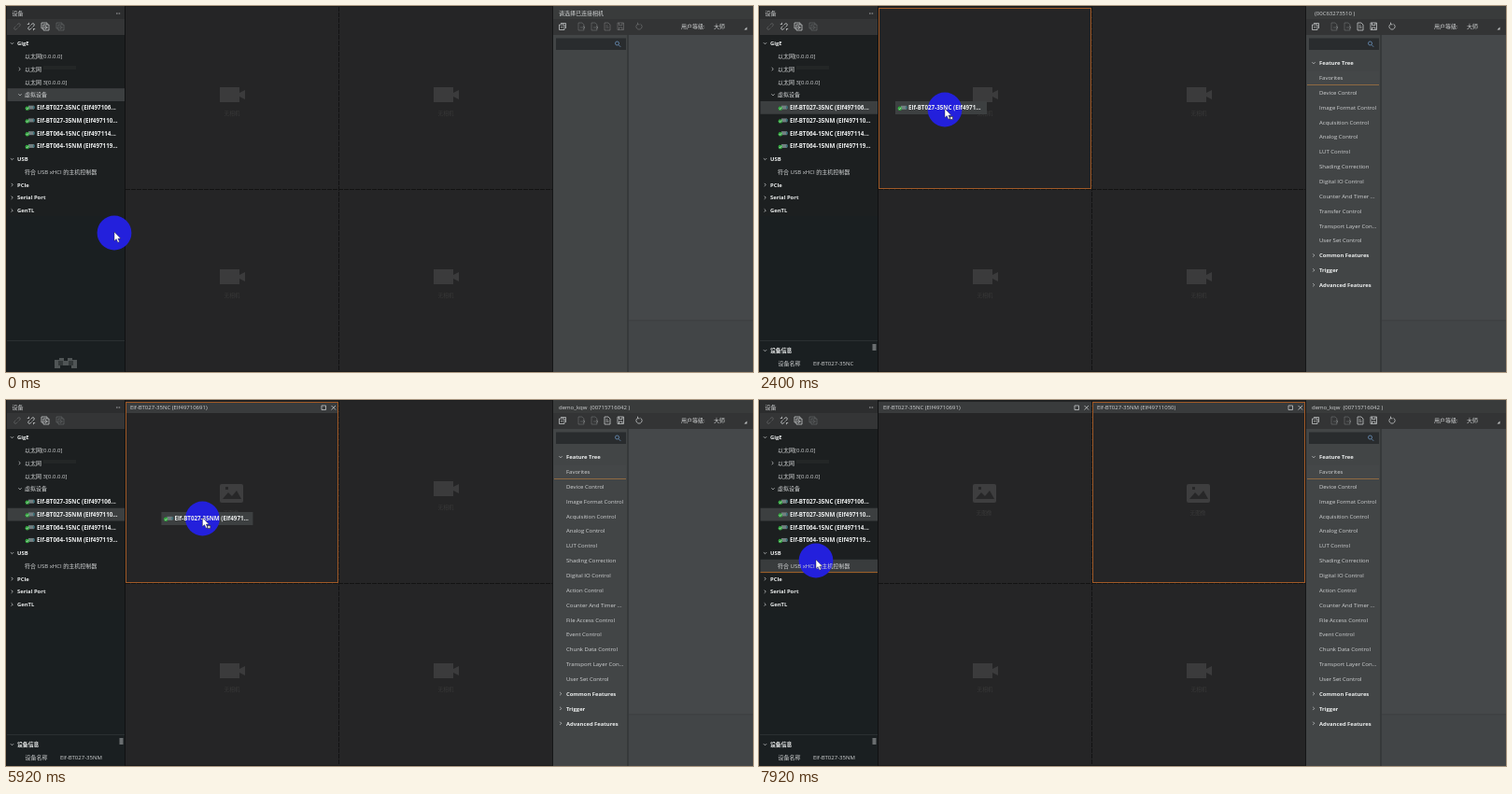
These frames come from a looping animation (800 by 392 pixels, 8000 ms). An HTML page:

```html
<!DOCTYPE html>
<html lang="zh-CN">
<head>
<meta charset="utf-8">
<title>Camera client</title>
<style>
html, body { margin: 0; width: 100%; height: 100%; overflow: hidden; background: #1b1d1e; }
svg { display: block; width: 800px; height: 392px; }
text { font: 6px "Open Sans", "Noto Sans CJK SC", "Noto Sans CJK", sans-serif; fill: #d2d4d5; white-space: pre; }
.b { font-weight: 700; font-size: 5.85px; fill: #eceeee; }
.dev { font-size: 6.25px; }
.cap { fill: #393939; text-anchor: middle; font-size: 5.6px; }
.line { fill: none; stroke: #c4c7c8; stroke-width: .8; }
.dim { opacity: .28; }
.split { fill: none; stroke: #131313; stroke-dasharray: 5 1; }
.lens { stroke: #6b93bd; }
</style>
</head>
<body>
<svg id="stage" viewBox="0 0 800 392" xmlns="http://www.w3.org/2000/svg"></svg>
<script>
const LOOP = 8000;
const stage = document.getElementById('stage');

function add(tag, attrs, parent = stage) {
  const el = document.createElementNS('http://www.w3.org/2000/svg', tag);
  for (const k in attrs) el.setAttribute(k, attrs[k]);
  parent.appendChild(el);
  return el;
}
const group = (parent, cls = '') => add('g', { class: cls }, parent);
const rect = (x, y, width, height, fill, parent) => add('rect', { x, y, width, height, fill }, parent);
const line = (d, parent, cls = 'line') => add('path', { d, class: cls }, parent);
function text(x, y, str, cls = '', parent) {
  const el = add('text', { x, y: y + 2.2, class: cls }, parent);
  el.textContent = str;
  return el;
}
const chevron = (x, y, open, parent) =>
  line(open ? `M${x - 1.6} ${y - .8}l1.6 1.6l1.6-1.6` : `M${x - .8} ${y - 1.6}l1.6 1.6l-1.6 1.6`, parent);
const show = (el, on) => el.setAttribute('visibility', on ? 'visible' : 'hidden');
const move = (el, x, y) => el.setAttribute('transform', `translate(${x} ${y})`);
const setText = (el, str) => { if (el.textContent !== str) el.textContent = str; };

// Panels
rect(0, 0, 800, 392, '#1b1d1e');
rect(1, 0, 126, 14, '#2c2d2e');
rect(1, 14, 126, 17, '#343536');
rect(1, 31, 126, 361, '#1c1f20');
rect(1, 225, 126, 167, '#1a1f21');
rect(127, 0, 1, 392, '#101112');
rect(128, 1, 457, 390, '#252526');
rect(585, 0, 1, 392, '#151617');
rect(586, 0, 214, 14, '#393b3b');
rect(586, 14, 214, 17, '#333435');
rect(586, 31, 79, 361, '#424546');
rect(665, 31, 1.5, 361, '#36393a');
rect(666.5, 31, 133.5, 361, '#45484a');
rect(667, 336.5, 133, 1, '#383b3c');
rect(667, 337.5, 133, 54, '#424547');
line('M128 196.5H585M356.5 1V391', stage, 'split');

// Left header and toolbar
text(6.5, 8, '设备');
line('M118 8h1.6m1 0h1.6');
const link = (x, cls) => line('M-.7-1.4h-2a1.4 1.4 0 0 0 0 2.8h2M.7-1.4h2a1.4 1.4 0 0 1 0 2.8h-2', stage, cls)
  .setAttribute('transform', `translate(${x} 22) rotate(-45)`);
const stack = (x, cls) => line(`M${x - 4} 18h6v2M${x - 4} 18v6h2M${x - 2} 20h6v6h-6ZM${x} 21.5v3l2.5-1.5Z`, stage, cls);
link(12, 'line dim');
link(27, 'line');
line('M22.8 19.5h2M24.5 17.8v1.6M29.2 24.5h2M29.5 24.6v1.6');
stack(42, 'line');
stack(58, 'line dim');

// Right header and toolbar
const title = text(592, 8, '');
line('M592.5 20h5.5v5.5h-5.5ZM594 18.5h5.5v5.5M594 22.8h2.5');
const doc = (x, mark) => line(`M${x - 3} 18h4l2 2v6h-6ZM${mark}`, stage);
[616, 630].forEach(x => doc(x, `${x - 1} 23h5m-2-2l2 2l-2 2`).setAttribute('opacity', .3));
const saves = [doc(644, '642.5 21h2m-2 2h3'), line('M655 18h6.5v7.5h-6.5ZM656.5 18v2.5h3.5V18M656.5 25.5v-2.5h3.5v2.5'),
  line('M679.5 19.3a3.1 3.1 0 1 1-3 0M676.5 17.6v2.2h2')];
text(723, 22, '用户等级:');
text(758, 22, '大师');
add('path', { d: 'M790.5 25.5h3v-3Z', fill: '#c4c6c7' });
rect(589, 34.5, 75, 12.5, '#292c2e');
line('M652.5 40a2 2 0 1 1 4 0a2 2 0 1 1-4 0M656 41.6l2.2 2.2', stage, 'line lens');

// Viewer cells
const cells = [[128, 2], [357, 2], [128, 197], [357, 197]].map(([x, y], i) => {
  const camera = group(), cx = x + 114;
  rect(cx - 13, y + 85, 21, 16, '#3b3b3c', camera);
  add('path', { d: `M${cx + 8} ${y + 91}l6-3v10l-6-3Z`, fill: '#3b3b3c' }, camera);
  text(cx, y + 113, '无相机', 'cap', camera);
  if (i > 1) return { camera };

  const view = group();
  rect(x, y, 228, 12, '#393b3c', view);
  text(x + 5, y + 6, ['Elf-BT027-35NC (Elf49710691)', 'Elf-BT027-35NM (Elf49711050)'][i], '', view);
  line(`M${x + 210} ${y + 4}h4.5v4.5h-4.5ZM${x + 220.5} ${y + 4}l4.5 4.5m0-4.5l-4.5 4.5`, view);
  add('rect', { x: cx - 13, y: y + 88, width: 25, height: 20, rx: 2, fill: '#3e3e3f' }, view);
  add('path', { d: `M${cx - 10} ${y + 104}l6-7l4 4l5-6l5 9ZM${cx - 7} ${y + 91}h3v3h-3Z`, fill: '#272728' }, view);
  text(cx - 1, y + 119, '无图像', 'cap', view);
  const frame = add('rect', { x: x + .5, y: y + .5, width: 227, height: 193, fill: 'none', stroke: '#a05a28' });
  return { camera, view, frame };
});

// Row backgrounds; the pointer's halo lies over them and under the text
const rowY = i => 40 + 13.77 * i;
const pick = rect(1.5, 0, 125.5, 13.8, '#3c3f40');
const hoverBg = rect(1.5, 0, 125.5, 13.8, '#393c3d');
const hoverLine = rect(1.5, 0, 125.5, 1, '#a8642a');
const labelBg = rect(0, -7, 98, 14, '#3d4041');
const halo = add('circle', { r: 18.4 });
const badge = group();
rect(112, -6.4, 14.5, 12.6, '#4c4f50', badge).setAttribute('opacity', .6);
line('M117-1.5l2-1.5l2.5 2.5l-1.5 2ZM117-1.5l2.5 3M115.5-4l7 7', badge);

// Device list
function deviceIcon(x, y, parent) {
  rect(x + 4, y - 2.2, 6, 4, '#727f81', parent);
  rect(x + 9, y - 1.6, 1.8, 2.8, '#3b6f78', parent);
  add('circle', { cx: x + 2.8, cy: y + .8, r: 2.2, fill: '#2fab3c' }, parent);
  line(`M${x + 1.6} ${y + .8}l1 1l1.6-2`, parent);
}
const models = ['Elf-BT027-35NC', 'Elf-BT027-35NM', 'Elf-BT064-15NC', 'Elf-BT064-15NM'];
const serials = ['497106', '497110', '497114', '497119'];
const deviceText = models.map((m, i) => {
  const y = rowY(5 + i);
  deviceIcon(20, y, stage);
  return text(33, y, '', 'b dev');
});
[[0, 'GigE', 1], [9, 'USB', 1], [11, 'PCIe', 0], [12, 'Serial Port', 0], [13, 'GenTL', 0]].forEach(([i, s, open]) => {
  chevron(6.5, rowY(i), open);
  text(12, rowY(i), s, 'b');
});
[[1, '以太网[0.0.0.0]'], [2, '以太网'], [3, '以太网 3[0.0.0.0]'], [4, '虚拟设备'], [10, '符合 USB xHCI 的主机控制器']]
  .forEach(([i, s]) => text(20, rowY(i), s));
chevron(14.5, rowY(2), false);
chevron(15, rowY(4), true);
rect(40, 64, 35, 4, '#232626');

// Device details
rect(1, 358, 126, 1, '#2a2f31');
const blank = group();
add('path', { d: 'M52 379h5v-2h5v3h4v-3h5v2h5v9h-6v-3h-12v3h-6Z', fill: '#505556' }, blank);
rect(56, 380, 5, 5, '#34393a', blank);
rect(67, 380, 5, 5, '#34393a', blank);
const info = group();
chevron(6.5, 369, true, info);
text(12, 369, '设备信息', 'b', info);
text(20.5, 383, '设备名称', '', info);
const infoName = text(58, 383, '', '', info);
rect(121.5, 362, 4, 7, '#6a6e70', info);

// Feature trees: the first has fewer entries than the second
const head = ['Favorites', 'Device Control', 'Image Format Control', 'Acquisition Control', 'Analog Control',
  'LUT Control', 'Shading Correction', 'Digital IO Control'];
const tail = ['Transport Layer Con...', 'User Set Control'];
const trees = [
  [...head, 'Counter And Timer ...', 'Transfer Control', ...tail],
  [...head, 'Action Control', 'Counter And Timer ...', 'File Access Control', 'Event Control', 'Chunk Data Control', ...tail]
].map(items => {
  const g = group();
  rect(587, 69.5, 77, 14.5, '#444748', g);
  rect(587, 84, 77, 1, '#8f6a42', g);
  ['Feature Tree', ...items, 'Common Features', 'Trigger', 'Advanced Features'].forEach((s, i) => {
    const y = 61 + 15.85 * i, bold = i === 0 || i > items.length;
    if (bold) chevron(594, y, i === 0, g);
    text(600, y, s, bold ? 'b' : '', g);
  });
  return g;
});

// Dragged label and pointer
const label = group();
deviceIcon(2, 0, label);
const labelText = text(14, 0, '', 'b dev', label);
const arrow = group();
add('path', { d: 'M0-1V8.6L2.2 6.6L3.8 10.2L5.4 9.5L3.9 6H6.8Z', fill: '#fff', stroke: '#222', 'stroke-width': .4 }, arrow);
const dragMark = add('rect', { x: 5.5, y: 7.5, width: 3, height: 3, fill: '#ddd', stroke: '#333', 'stroke-width': .6 }, arrow);

const path = [[0, 116, 243], [150, 116, 243], [800, 87, 111], [1850, 87, 111], [2400, 199, 111], [2720, 236, 112],
  [2900, 236, 112], [3600, 122, 137], [3800, 120, 130], [4450, 81, 127], [5550, 81, 127], [6600, 533, 127],
  [6860, 540, 125], [7020, 540, 125], [7800, 61, 172], [8000, 61, 172]];

function pointer(t) {
  const i = Math.max(1, path.findIndex(p => p[0] > t));
  const [t0, x0, y0] = path[i - 1], [t1, x1, y1] = path[i];
  const u = (t - t0) / (t1 - t0), e = u * u * (3 - 2 * u);
  return [x0 + (x1 - x0) * e, y0 + (y1 - y0) * e];
}

function draw(t) {
  const [x, y] = pointer(t);
  const within = (a, b) => t >= a && t < b;
  const drag = within(1900, 2780) ? 0 : within(5620, 6900) ? 1 : -1;
  const dragging = drag >= 0;
  const linked = t >= 1240, second = t >= 5300;

  const row = Math.round((y - 40) / 13.77);
  const hover = !dragging && x < 127 && row > 0 && row < 14 ? row : -1;
  const overDevice = hover > 4 && hover < 9;
  const selected = t < 820 ? 4 : t < 5100 ? 5 : 6;

  pick.setAttribute('y', rowY(selected) - 6.9);
  show(hoverBg, hover > 0);
  show(hoverLine, hover > 0);
  show(badge, overDevice);
  if (hover > 0) {
    hoverBg.setAttribute('y', rowY(hover) - 6.9);
    hoverLine.setAttribute('y', rowY(hover) + 6.4);
    move(badge, 0, rowY(hover));
  }
  deviceText.forEach((el, i) => setText(el, `${models[i]} (Elf${hover === i + 5 ? '' : serials[i]}...`));

  show(blank, t < 820);
  show(info, t >= 820);
  setText(infoName, models[selected === 6 ? 1 : 0]);

  setText(title, second ? 'demo_kqw  (00715716042 )' : linked ? '(00C63273510 )' : '请选择已连接相机');
  title.setAttribute('x', linked && !second ? 595 : 592);
  saves.forEach(s => s.setAttribute('opacity', linked ? 1 : .35));
  show(trees[0], linked && !second);
  show(trees[1], second);

  [t >= 2800, t >= 6920].forEach((open, i) => {
    show(cells[i].view, open);
    show(cells[i].camera, !open);
  });
  const enteredSecond = t > 5620 && (x > 357 || t > 6600);
  show(cells[0].frame, t > 1900 && (x > 128 || t > 2400) && !enteredSecond);
  show(cells[1].frame, enteredSecond);

  [labelBg, label, dragMark].forEach(el => show(el, dragging));
  if (dragging) {
    setText(labelText, `${models[drag]} (Elf4971...`);
    [labelBg, label].forEach(el => move(el, x - (drag ? 44 : 53), y - (drag ? 0 : 2)));
  }
  halo.setAttribute('fill', overDevice ? '#343ad8' : '#2320dc');
  move(halo, x, y);
  move(arrow, x, y);
}

const start = performance.now();
function tick() {
  draw((performance.now() - start) % LOOP);
  requestAnimationFrame(tick);
}
tick();
</script>
</body>
</html>
```
